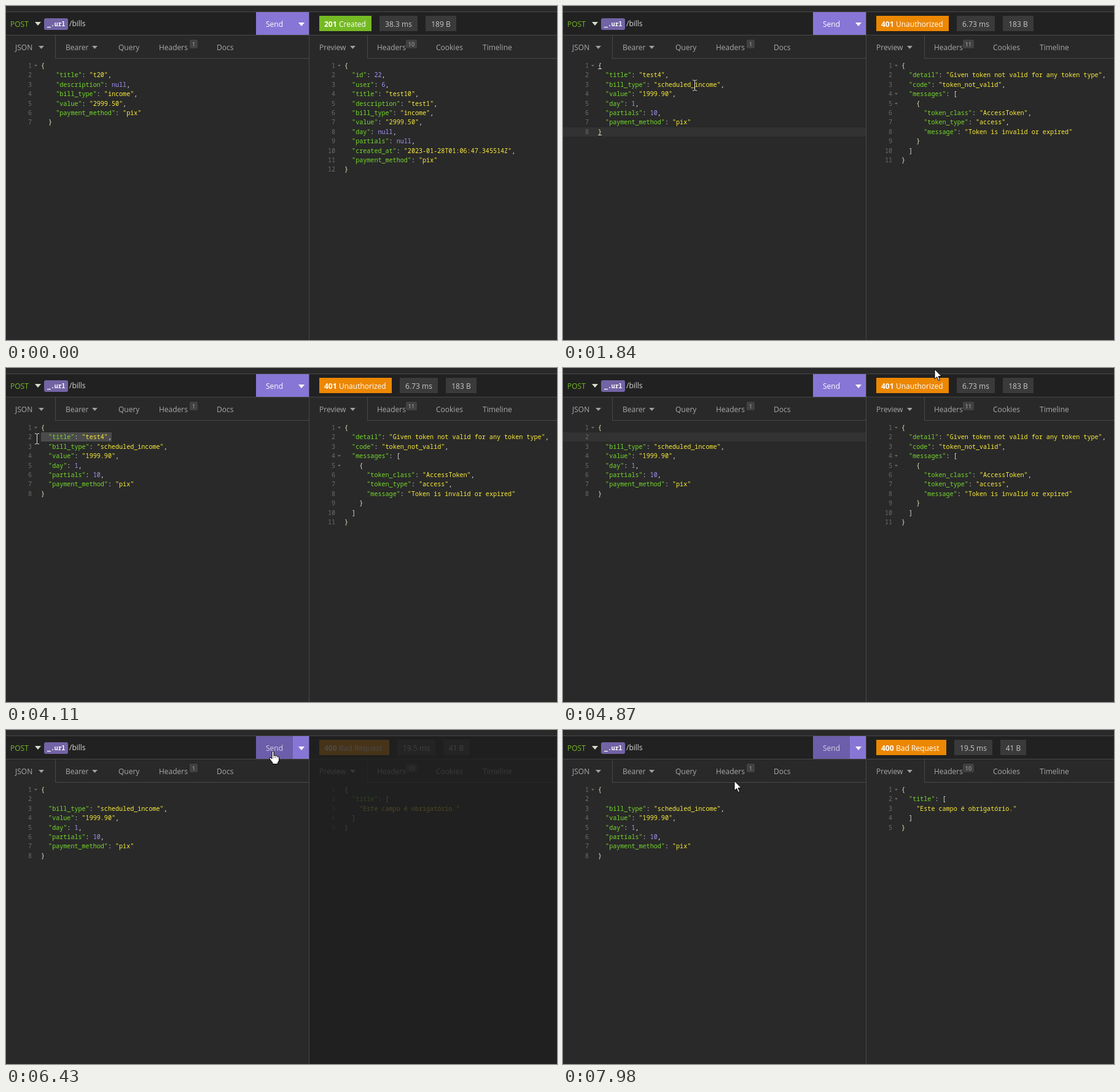
These frames come from a looping animation (897x545 px, 8000 ms). An HTML page with a canvas:

```html
<!DOCTYPE html>
<html lang="en">
<head>
<meta charset="utf-8">
<style>
html, body { margin: 0; width: 100%; height: 100%; overflow: hidden; background: #292929; }
canvas { display: block; }
</style>
</head>
<body>
<canvas id="stage" width="897" height="545"></canvas>
<script>
const ctx = document.getElementById('stage').getContext('2d');
const UI = '"Open Sans", "Noto Sans", sans-serif';
const MONO = '"Noto Sans Mono", "DejaVu Sans Mono", monospace';
const CHAR = 6.05, ROW = 15.4, LOOP = 8000;

const draft = `{
    "title": "t20",
    "description": null,
    "bill_type": "income",
    "value": "2999.50",
    "payment_method": "pix"
  }`.split('\n');
const bill = `{
  "title": "test4",
  "bill_type": "scheduled_income",
  "value": "1999.90",
  "day": 1,
  "partials": 10,
  "payment_method": "pix"
}`.split('\n');
const untitled = bill.map((line, i) => i === 1 ? '' : line);

const created = {
  code: '201', label: 'Created', color: '#75ba24', time: '38.3 ms', size: '189 B',
  widths: [85, 62, 50], headers: '10', folds: [0],
  body: `{
  "id": 22,
  "user": 6,
  "title": "test10",
  "description": "test1",
  "bill_type": "income",
  "value": "2999.50",
  "day": null,
  "partials": null,
  "created_at": "2023-01-28T01:06:47.345514Z",
  "payment_method": "pix"
}`.split('\n')
};
const denied = {
  code: '401', label: 'Unauthorized', color: '#ec8702', time: '6.73 ms', size: '183 B',
  widths: [118, 62, 50], headers: '11', folds: [0, 3, 4],
  body: `{
  "detail": "Given token not valid for any token type",
  "code": "token_not_valid",
  "messages": [
    {
      "token_class": "AccessToken",
      "token_type": "access",
      "message": "Token is invalid or expired"
    }
  ]
}`.split('\n')
};
const invalid = {
  code: '400', label: 'Bad Request', color: '#ec8702', time: '19.5 ms', size: '41 B',
  widths: [114, 62, 42], headers: '10', folds: [0, 1],
  body: `{
  "title": [
    "Este campo é obrigatório."
  ]
}`.split('\n')
};

// Pointer path: time, x, y
const path = [
  [870, 301, 251], [1030, 301, 251], [1870, 213, 127], [2200, 172, 113], [2340, 172, 112],
  [2620, 126, 112], [2690, 89, 113], [3100, 41, 113], [3590, 41, 114], [3730, 50, 124],
  [3860, 52, 120], [4090, 52, 120], [4120, 50, 115], [4200, 50, 115], [4890, 606, 2],
  [5030, 528, 16], [5160, 434, 33], [6220, 434, 33], [6230, 434, 34], [7520, 434, 34],
  [7980, 279, 83]
];
const arrow = new Path2D('M0 0V16L3.7 12.5L6.2 18.5L8.6 17.5L6.1 11.6H11.2Z');
const hand = new Path2D('M-1 1.5Q.5-.5 2 1.5V8Q4 6.5 5 8.3Q7 7.2 8 9Q10.3 8.5 10.5 11V15' +
  'Q10.5 17 8.5 19V21.5H0V19.5L-5 13Q-5.5 10.5-3 11L-1 13Z');
const beam = new Path2D('M-3.5-8.5H-1.5L0-7.5L1.5-8.5H3.5M0-7.5V7.5M-3.5 8.5H-1.5L0 7.5L1.5 8.5H3.5');

function rect(x, y, w, h, color, r = 0) {
  ctx.fillStyle = color;
  ctx.beginPath();
  ctx.roundRect(x, y, w, h, r);
  ctx.fill();
}

function text(str, x, y, color, font = '12px ' + UI, align = 'left') {
  ctx.font = font;
  ctx.fillStyle = color;
  ctx.textAlign = align;
  ctx.fillText(str, x, y);
}

function caret(x, y, color, w = 10, h = 6) {
  ctx.fillStyle = color;
  ctx.beginPath();
  ctx.moveTo(x, y);
  ctx.lineTo(x + w, y);
  ctx.lineTo(x + w / 2, y + h);
  ctx.fill();
}

function tokenColor(tok, rest) {
  if (tok[0] === '"') return rest[0] === ':' ? '#76d82c' : '#fbec3c';
  if (/^(null|\d)/.test(tok)) return '#a294f5';
  return /[{}]/.test(tok) ? '#f0ecc8' : '#e4e4e4';
}

function code(lines, x, folds) {
  lines.forEach((line, i) => {
    const y = Math.round(101 + i * ROW);
    text(i + 1, x - 15, y, '#6c6c6c', '10px ' + MONO, 'right');
    if (folds.includes(i)) caret(x - 11, y - 5, '#686868', 5, 3);
    for (const m of line.matchAll(/"[^"]*"|null|\d+|\S/g)) {
      const rest = line.slice(m.index + m[0].length);
      text(m[0], x + m.index * CHAR, y, tokenColor(m[0], rest), `10.08px ${MONO}`);
    }
  });
}

function tabs(items, x, activeEnd, end) {
  items.forEach(([label, tx, caretX]) => {
    text(label, tx, 72, '#a9a9a9');
    if (caretX) caret(caretX, 65, '#a0a0a0', 9, 5);
  });
  rect(activeEnd, 48, 1, 38, '#484848');
  rect(activeEnd, 85, end - activeEnd, 1, '#484848');
}

function count(str, x, w) {
  rect(x, 55, w, 14, '#414141', 2);
  text(str, x + w / 2, 65.5, '#b0b0b0', '9px ' + UI, 'center');
}

function request(lines, hover) {
  text('POST', 7, 34, '#75ba24');
  caret(47, 26, '#d4dccb');
  rect(62, 20, 39, 19, '#7264a5', 3);
  text('_.url', 67, 33, '#fff', 'bold 9.8px ' + MONO);
  text('/bills', 103, 33, '#d8d8d8');
  rect(407, 10, 86, 37, '#8776d5');
  if (hover) rect(407, 10, 60, 37, '#6c5eaa');
  text('Send', 423, 34, hover ? '#d5d0e6' : '#fff');
  caret(476, 27, '#fff');
  tabs([['JSON', 15, 53], ['Bearer', 97, 140], ['Query', 183], ['Headers', 249], ['Docs', 343]],
    0, 80, 493);
  count('1', 299, 13);
  code(lines, 57, [0]);
}

function response(res, folds) {
  const [a, b, c] = res.widths;
  rect(510, 16, a, 25, res.color);
  text(res.code, 518, 34, '#fff', 'bold 12px ' + UI);
  text(res.label, 542, 34, '#fff');
  rect(523 + a, 16, b, 25, '#3a3a3a');
  text(res.time, 523 + a + b / 2, 34, '#c8c8c8', undefined, 'center');
  rect(536 + a + b, 16, c, 25, '#3a3a3a');
  text(res.size, 536 + a + b + c / 2, 34, '#c8c8c8', undefined, 'center');
  tabs([['Preview', 510, 560], ['Headers', 604], ['Cookies', 700], ['Timeline', 776]],
    494, 588, 897);
  count(res.headers, 651, 18);
  code(res.body, 551, folds ? res.folds : []);
}

function pointer(t) {
  const s = 890 + Math.floor((t - 850) / 69) * 69;
  const i = path.findIndex(p => p[0] > s);
  if (i < 0) return path[path.length - 1].slice(1);
  const [t0, x0, y0] = path[i - 1], [t1, x1, y1] = path[i];
  const k = (s - t0) / (t1 - t0);
  return [Math.round(x0 + (x1 - x0) * k), Math.round(y0 + (y1 - y0) * k)];
}

function drawPointer(x, y) {
  const inSend = x >= 407 && x < 493 && y > 9 && y < 47;
  const inEditor = x < 493 && y > 86;
  ctx.save();
  ctx.translate(x, y);
  if (inEditor) {
    ctx.translate(.5, .5);
    ctx.strokeStyle = 'rgba(0,0,0,.6)';
    ctx.lineWidth = 2.5;
    ctx.stroke(beam);
    ctx.strokeStyle = '#fff';
    ctx.lineWidth = 1;
    ctx.stroke(beam);
  } else {
    const shape = inSend ? hand : arrow;
    ctx.fillStyle = '#fff';
    ctx.strokeStyle = '#000';
    ctx.lineWidth = 1;
    ctx.fill(shape);
    ctx.stroke(shape);
    if (inSend) {
      for (const fx of [2, 5, 8]) rect(fx - .4, 8, .8, 4, '#555');
    }
  }
  ctx.restore();
}

function dimming(t) {
  if (t < 5340 || t >= 6560) return 0;
  if (t < 5400) return .3;
  if (t < 5470) return .6;
  return t < 6500 ? .8 : .4;
}

function draw(t) {
  const between = (a, b) => t >= a && t < b;
  const [x, y] = t < 870 ? [0, 0] : pointer(t);

  rect(0, 0, 897, 545, '#292929');
  rect(0, 10, 897, 37, '#212121');
  rect(0, 9, 897, 1, '#484848');
  rect(0, 47, 897, 1, '#484848');

  if (between(870, 2270)) {
    rect(0, 198, 493, 15, '#323232');
    rect(57, 102, 6, 1, '#d8d8d8');
    rect(57, 210, 6, 1, '#d8d8d8');
  }
  if (between(2270, 4250)) {
    const col = Math.min(19, Math.max(0, Math.round((x - 48) / CHAR)));
    const left = t < 3090 ? 57 + col * CHAR : 57;
    rect(left, 105, 172 - left, 15, '#4b4b4b');
  }
  if (between(4250, 5340)) rect(0, 105, 493, 15, '#323232');

  request(t < 870 ? draft : t < 4250 ? bill : untitled, t >= 5080);
  response(t < 870 ? created : t < 6430 ? denied : invalid, t < 6430 || t >= 6760);

  const dim = dimming(t);
  if (dim) rect(494, 10, 403, 535, `rgba(30,30,30,${dim})`);
  rect(493, 10, 1, 535, '#484848');

  if (t < 870) return;
  if (between(2270, 3360) || between(5270, 5400)) {
    rect(x - 14, y - 13, 24, 24, 'rgba(200,185,20,.78)', 12);
  }
  drawPointer(x, y);
}

const start = performance.now();
function tick() {
  draw((performance.now() - start) % LOOP);
  requestAnimationFrame(tick);
}
tick();
</script>
</body>
</html>
```
